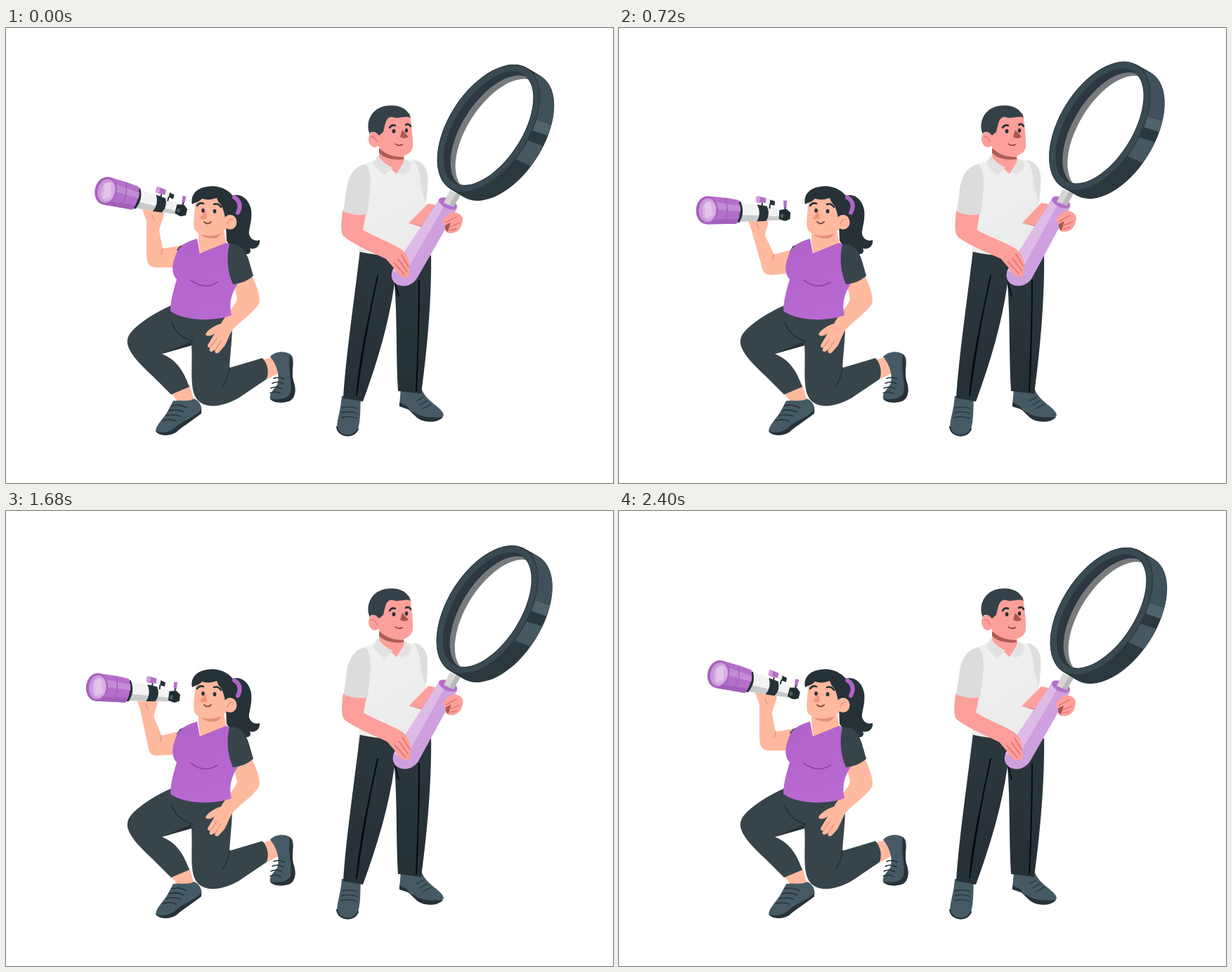
An HTML page with a canvas for the animation above (2440 ms loop, 864x648 px).

```html
<!DOCTYPE html>
<html lang="en">
<head>
<meta charset="utf-8">
<title>Looking out</title>
<style>
html, body { margin: 0; width: 100%; height: 100%; overflow: hidden; background: #fff; }
canvas { display: block; }
</style>
</head>
<body>
<canvas id="c" width="864" height="648"></canvas>
<script>
const ctx = document.getElementById('c').getContext('2d');
const LOOP = 2440, STEP = 40, SWING = 960, SECOND = 1480;
const DARK = '#263238', SLATE = '#37454b', SHOE = '#455a64', PURPLE = '#b46fca';
const SKIN_W = '#ffb99f', LINE_W = '#e08f76', SKIN_M = '#fd9f9b', LINE_M = '#d9716d';
const TILT = -57;

const fill = (d, color) => { ctx.fillStyle = color; ctx.fill(new Path2D(d)); };
const line = (d, color, w = 1.2) => {
  ctx.strokeStyle = color;
  ctx.lineWidth = w;
  ctx.stroke(new Path2D(d));
};
const trace = (x, y, rx, ry, turn = 0) => {
  ctx.beginPath();
  ctx.ellipse(x, y, rx, ry, turn * Math.PI / 180, 0, Math.PI * 2);
};
const oval = (x, y, rx, ry, color, turn) => {
  trace(x, y, rx, ry, turn);
  ctx.fillStyle = color;
  ctx.fill();
};
const turned = (x, y, deg, draw) => {
  ctx.save();
  ctx.translate(x, y);
  ctx.rotate(deg * Math.PI / 180);
  ctx.translate(-x, -y);
  draw();
  ctx.restore();
};
const shade = (x0, y0, x1, y1, a, b) => {
  const g = ctx.createLinearGradient(x0, y0, x1, y1);
  g.addColorStop(0, a);
  g.addColorStop(1, b);
  return g;
};

// 0 at rest, 1 at the far end of the swing
function swing(t) {
  const e = t >= SECOND ? t - SECOND : t;
  if (e >= SWING) return 0;
  const x = 1 - Math.abs(e / (SWING / 2) - 1);
  const a = x ** 1.9, b = (1 - x) ** 1.9;
  return a / (a + b);
}

function womanLegs() {
  fill('M234 519 L261 508 L268 531 L250 539 Z', SKIN_W);
  fill('M367 472 L381 468 L389 491 L372 500 Z', SKIN_W);
  fill('M376 468 C386 458 404 460 408 469 C411 480 405 492 409 503 C413 513 413 526 404 531 C394 535 380 534 376 528 C374 521 382 514 386 508 C390 497 387 482 376 468 Z', SHOE);
  fill('M404 464 C411 475 406 490 409 502 C413 513 413 526 404 531 C394 535 380 534 376 528 C390 530 402 528 405 519 C408 505 401 492 404 464 Z', DARK);
  line('M381 499 Q389 496 396 500 M379 506 Q387 502 395 507 M377 513 Q386 509 393 514 M376 520 Q384 516 391 521', DARK, 1.5);
  fill('M238 531 C248 529 259 533 268 528 C276 531 280 541 278 547 C269 557 252 565 241 576 C230 582 217 580 213 574 C214 564 224 557 230 546 Z', SHOE);
  fill('M213 574 C222 578 234 576 242 568 C253 558 268 555 278 544 L278 549 C267 558 253 566 242 576 C231 582 217 581 213 574 Z', DARK);
  line('M236 538 Q248 535 257 541 M232 545 Q244 542 253 547 M228 552 Q240 549 248 553 M223 559 Q235 556 242 560', DARK, 1.6);
  fill('M238 394 C213 404 179 426 174 440 C168 454 183 472 209 496 L235 522 L261 511 C253 490 245 474 222 464 L264 452 C266 480 261 510 270 526 C280 543 306 541 331 527 L371 500 C375 490 372 477 365 470 L318 484 C320 455 323 435 322 406 Z', SLATE);
  fill('M222 464 L264 446 L264 452 Z', '#263137');
  line('M236 419 Q243 440 266 446', '#252f34', 2);
  line('M318 484 Q316 500 308 511', '#273238', 1.8);
}

function womanArm(p, q) {
  const at = (x0, y0, x1, y1, k = p) => `${x0 + (x1 - x0) * k} ${y0 + (y1 - y0) * p} `;
  fill('M' + at(194, 258, 177, 284, q) +
    'L' + at(200, 275, 182, 296, q) +
    'L' + at(200, 324, 205, 350) +
    'C' + at(201, 337, 208, 361) + at(204, 340, 212, 362) + at(213, 341, 219, 363) +
    'L' + at(245, 341, 248, 357) +
    'L' + at(249, 310, 248, 320) +
    'L' + at(223, 314, 218, 331) +
    'L' + at(218, 288, 203, 303, q) +
    'C' + at(219, 280, 203, 295, q) + at(226, 270, 208, 292, q) + at(225, 258, 206, 282, q) + 'Z', SKIN_W);
  line('M' + at(223, 314, 218, 331) + 'L' + at(221, 323, 217, 339), LINE_W);
  line('M' + at(208, 266, 190, 290, q) + 'L' + at(211, 275, 193, 297, q), LINE_W, 1);
  fill('M' + at(243, 316, 242, 324) + 'L247 311 L258 306 L252 330 Z', SLATE);
}

function telescope(p, q) {
  ctx.save();
  ctx.translate(143 - 25 * q, 232 + 55 * p);
  ctx.rotate((14.2 - 22 * p) * Math.PI / 180);
  fill('M44 -14 L106 -8 L106 8 L44 14 Z', '#f3f3f3');
  fill('M44 4 L106 3 L106 8 L44 14 Z', '#c9c9c9');
  fill('M40 -15 L46 -15 Q54 0 46 15 L40 15 Z', DARK);
  fill('M70 -12 Q77 0 71 12 L84 10.5 Q90 0 84 -10.5 Z', DARK);
  fill('M102 -6 L112 -8 L118 -3 L118 6 L112 9 L102 7 Z', DARK);
  oval(109, 1, 6.5, 8, '#222b30', -8);
  oval(106, 2, 2.5, 3, SHOE);
  // finder scope and knob
  line('M77 -10 L77 -17 M88 -8 L88 -15', DARK, 2);
  fill('M75 -24 L94 -19 L94 -13 L75 -15 Z', '#eeeeee');
  fill('M70 -24 L82 -22 L82 -15 L70 -15 Z', PURPLE);
  oval(70.5, -19.5, 3, 4.7, '#d19fde');
  fill('M88 -20 L95 -18 L95 -12 L88 -13 Z', DARK);
  fill('M107 -20 L112 -20 L112 -10 L108 -10 Z', PURPLE);
  line('M110 -10 L110 -4', DARK, 2);
  // hood
  fill('M0 -20 L27 -19 L43 -17 Q50 0 42 17 L26 18 L0 20 Z', PURPLE);
  fill('M0 -13 L46 -9 L47 -1 L4 -2 Z', '#c48bd5');
  fill('M4 13 L45 10 L42 17 L0 20 Z', '#a260b9');
  line('M24 -18 Q32 0 24 18', '#a05cb7', 1.3);
  oval(-1, 0, 15.5, 20, '#a761be');
  oval(0, 0, 12.5, 17, '#cb98d9');
  oval(2, 0, 9.5, 14, '#d8b1e2');
  fill('M-5 -9 L3 -13 L8 6 L-2 12 Z', '#e3c5ea');
  ctx.restore();
}

function womanTop() {
  fill('M318 240 C333 233 346 243 349 259 C351 275 345 286 346 294 C349 302 355 304 361 302 C362 311 355 316 347 314 C350 319 346 323 341 322 C331 321 320 314 314 303 L313 280 Z', DARK);
  fill('M274 282 L274 304 L277 322 L314 308 L309 282 Z', SKIN_W);
  fill('M324 363 L351 355 C358 369 363 386 360 393 C352 405 335 417 326 426 C319 432 316 445 311 453 L303 462 C299 465 296 462 298 458 L293 461 C289 461 289 458 291 455 C287 456 286 453 288 450 L297 435 C292 439 286 440 284 436 C287 430 296 424 306 421 C312 409 326 396 329 386 Z', SKIN_W);
  line('M291 455 L300 442 M298 459 L306 446', LINE_W);
  fill('M272 300 C258 304 247 309 242 322 C235 339 236 351 243 358 C239 371 234 388 234 403 C254 418 298 418 321 409 C317 394 320 379 330 364 C320 351 314 330 319 308 L313 306 L276 321 Z', shade(250, 300, 290, 420, '#b163cb', '#b969d2'));
  line('M263 359 Q282 374 301 362', '#8d45a5', 1.8);
  fill('M318 308 C333 306 341 316 346 332 L352 353 C343 361 333 364 323 365 C316 349 313 328 318 308 Z', SLATE);
}

function womanHead() {
  fill('M270 244 C269 260 265 281 269 288 C276 297 297 298 308 292 L317 282 L320 240 Z', SKIN_W);
  fill('M277 294 Q292 299 307 292 L301 299 Q287 302 277 294 Z', LINE_W);
  fill('M265 251 C262 237 272 228 286 226 C302 223 320 231 325 243 C330 256 328 265 323 268 C318 265 314 267 312 271 C311 263 308 255 306 252 C303 249 301 246 300 242 C292 245 285 245 279 243 C276 247 270 248 265 251 Z', DARK);
  oval(319, 276.5, 9.5, 10.5, SKIN_W);
  line('M323 272 Q317 272 315 279', LINE_W);
  line('M325 241 Q337 249 330 263', '#b064c9', 6);
  line('M272 253 Q275 248 281 250 M296 251 Q302 249 306 255', DARK, 2.6);
  oval(280.5, 260, 2.3, 3, DARK);
  oval(297, 261, 2.4, 3, DARK);
  fill('M284 259 L276 271 Q280 274 286 271 Z', '#f4957c');
  line('M282 276 Q287 281 292 276', '#86473f', 1.8);
}

function manLegs() {
  fill('M478 524 L505 524 C504 546 505 560 500 574 C495 583 480 584 473 575 C468 564 476 550 478 524 Z', SHOE);
  line('M471 568 C473 583 495 585 501 571', DARK, 2);
  line('M479 541 Q490 538 500 542 M478 548 Q489 545 500 549 M477 555 Q488 552 499 556', DARK, 1.3);
  fill('M562 513 L592 515 C599 533 621 540 623 551 C620 561 599 562 589 556 C580 549 576 541 570 540 L560 537 Z', SHOE);
  fill('M560 533 L570 538 C580 548 589 557 622 554 C615 563 596 562 588 557 C578 550 575 543 569 542 L560 539 Z', DARK);
  line('M584 531 L594 526 M589 537 L599 531 M594 542 L605 536', DARK, 1.3);
  fill('M504 316 L605 320 C606 370 602 440 591 521 L558 517 C555 470 557 415 553 364 C545 420 529 475 508 532 L480 527 C484 465 496 385 504 316 Z', shade(500, 340, 560, 530, '#2b373c', '#253036'));
  fill('M530 350 C520 394 505 452 498 523 C505 474 514 422 530 350 Z', '#060809');
  line('M529 353 Q510 438 499 523 M588 360 Q588 430 584 517', '#07090a', 2);
  line('M554 364 L559 382', '#0c1012', 2);
}

function manBody() {
  fill('M527 187 L508 195 C516 217 517 241 512 266 L502 318 C525 325 575 327 605 324 L598 249 C602 220 603 199 589 191 L567 186 Z', shade(515, 190, 595, 320, '#f0f0f0', '#ebebeb'));
  fill('M580 188 C596 190 602 205 600 222 L598 249 C594 241 592 233 590 220 C589 205 586 195 580 188 Z', '#dedede');
  fill('M532 166 L531 185 L556 208 L567 190 L566 174 Z', SKIN_M);
  fill('M531 171 C540 179 552 184 566 184 L566 187 C550 189 536 184 531 178 Z', '#ad5c56');
  fill('M529 181 L522 194 L538 210 L550 199 C540 194 533 188 529 181 Z', '#e2e2e2');
  fill('M567 186 L577 192 L575 203 L565 209 L557 205 C562 200 566 194 567 186 Z', '#e2e2e2');
}

function manHead() {
  fill('M533 130 L575 121 C577 139 580 158 579 170 C576 181 563 185 550 182 C537 178 530 171 528 163 Z', SKIN_M);
  fill('M516 146 C513 129 523 114 540 111 C556 108 572 113 576 128 C569 124 560 130 551 127 C541 125 540 136 537 148 L531 153 C523 146 518 147 518 152 Z', '#344148');
  oval(524, 159, 8, 11, SKIN_M, -8);
  line('M519 155 Q525 153 528 162', LINE_M);
  line('M546 142 Q549 137 554 139 M569 138 Q573 135 576 140', DARK, 2.6);
  oval(552, 147, 2.4, 3, DARK);
  oval(570, 146, 2.2, 2.9, DARK);
  fill('M564 145 L573 155 Q567 159 561 155 Z', '#a95650');
  line('M554 165 Q559 169 564 166', '#7d3835', 1.6);
}

const ring = (dx, dy, a, b, color) => oval(687 + dx, 143 + dy, a, b, color, TILT);

function magnifier() {
  fill('M573 278 L601 250 L622 254 L616 287 Z', SKIN_M);
  fill('M573 278 L603 284 L616 278 L612 289 Z', LINE_M);
  fill('M616 245 L642 257 L587 353 C580 368 565 370 556 365 C548 360 547 351 551 343 Z', '#cfa0df');
  fill('M616 245 L626 250 L567 351 L550 346 Z', '#debbe7');
  oval(629, 250, 14, 7, PURPLE, 25);
  fill('M632 231 L647 238 L637 255 L623 249 Z', '#d5d5d5');
  fill('M641 235 L647 238 L637 255 L631 252 Z', '#b9b9b9');

  for (let i = 20; i >= 0; i--) ring(i, i * .6, 102, 57, '#2b393f');
  ctx.save();
  trace(706.5, 155, 102, 57, TILT);
  ctx.clip();
  fill('M740 50 L790 62 L790 141 L746 128 Z', '#3f515a');
  fill('M746 128 L790 142 L784 158 L744 144 Z', '#50636c');
  fill('M735 158 L768 169 L748 197 L716 183 Z', '#465963');
  ctx.restore();
  ring(0, 0, 102, 57, '#2c3a41');
  ring(-.3, -.2, 100.8, 55.8, '#394a52');
  ring(0, 0, 92, 48, '#2b383f');
  ctx.save();
  trace(687, 143, 91, 47, TILT);
  ctx.clip();
  ring(9, 5, 91, 47, '#777b7d');
  ring(16, 10, 91, 47, '#ffffff');
  ctx.restore();

  fill('M621 275 C626 266 635 261 641 263 C649 265 652 272 649 278 C648 285 642 292 634 292 C627 293 623 288 626 283 Z', SKIN_M);
  fill('M625 281 L633 277 L629 290 Q624 288 625 281 Z', '#a9564f');
  line('M626 277 L641 269 M632 283 L645 278 M632 288 L641 286', LINE_M, 1.3);
}

function manArm() {
  fill('M479 260 C478 274 475 288 480 296 C493 308 525 321 541 329 L553 343 C558 352 566 358 573 354 C576 350 574 345 574 337 C574 327 567 317 559 313 C544 304 521 296 508 287 L513 262 Z', SKIN_M);
  line('M552 334 L567 351 M558 329 L571 347 M563 323 L573 340', LINE_M, 1.5);
  fill('M512 194 C494 197 486 213 484 235 L480 261 Q497 269 514 265 L518 235 C520 214 518 201 512 194 Z', '#dcdcdc');
}

function draw(t) {
  const p = swing(t), q = 1.7 * p - .7 * p * p;
  ctx.fillStyle = '#fff';
  ctx.fillRect(0, 0, 864, 648);
  ctx.lineCap = 'round';
  ctx.lineJoin = 'round';

  womanLegs();
  womanArm(p, q);
  womanTop();
  womanHead();
  telescope(p, q);

  manLegs();
  manBody();
  manHead();
  turned(562, 244, -3 * p, magnifier);
  turned(505, 210, -2 * p, manArm);
}

const start = performance.now();
function tick() {
  const t = (performance.now() - start) % LOOP;
  draw(Math.floor(t / STEP) * STEP);
  requestAnimationFrame(tick);
}
tick();
</script>
</body>
</html>
```
